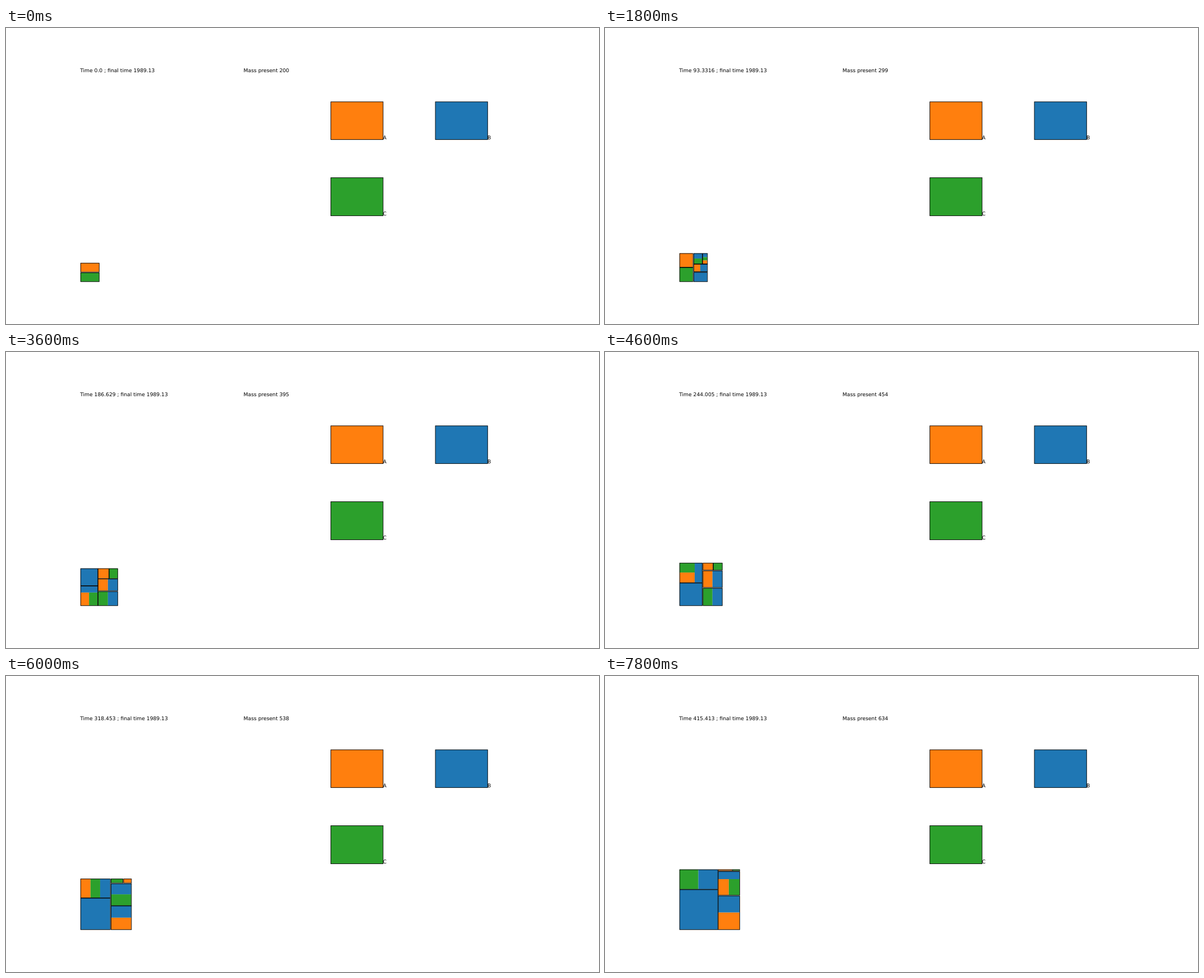
These frames come from a looping animation (1058x529 px, 8000 ms). An HTML page:

```html
<!DOCTYPE html>
<html lang="en">
<head>
<meta charset="utf-8">
<title>Reaction treemap</title>
<style>
html, body { margin: 0; width: 100%; height: 100%; overflow: hidden; background: #fff; }
svg { display: block; }
text { font: 13.89px "DejaVu Sans", sans-serif; text-rendering: geometricPrecision; white-space: pre; }
.edge { fill: none; stroke: #000; stroke-width: 1.39; }
</style>
</head>
<body>
<svg width="1058" height="529" viewBox="0 0 1600 800">
  <g id="legend"></g>
  <g id="map"></g>
  <text id="time" x="200" y="119.5"></text>
  <text id="mass" x="641" y="119.5"></text>
</svg>
<script>
const STEP = 200, STEPS = 40;
const LEFT = 200, BOTTOM = 685.82, SCALE = 0.2575, PAD = 0.67;
const COLORS = { A: '#ff7f0e', B: '#1f77b4', C: '#2ca02c' };

// step, clock, total mass, then counts of AB, CB and ACB
const KEYS = [
  [0, 0, 200, 0, 0, 0],
  [9, 93.3316, 299, 21, 18, 7],
  [18, 186.629, 395, 35, 41, 33],
  [23, 244.005, 454, 42, 44, 38],
  [30, 318.453, 538, 52, 48, 40],
  [35, 370.382, 589, 59, 59, 36],
  [39, 415.413, 634, 65, 67, 31]
];

const $ = id => document.getElementById(id);
const sum = list => list.reduce((a, b) => a + b, 0);

function rect(x0, y0, x1, y1, attrs) {
  return `<rect x="${x0}" y="${y0}" width="${x1 - x0}" height="${y1 - y0}" ${attrs}/>`;
}

// Fills sit on whole units, outlines half a unit further.
function fill(b, color) {
  return rect(...corners(b), `fill="${color}"`);
}

function edge(b) {
  return rect(...corners(b).map(v => v + 0.5), 'class="edge"');
}

function corners({ x, y, w, h }) {
  return [LEFT + x, BOTTOM - y - h, LEFT + x + w, BOTTOM - y].map(v => Math.floor(v + 0.5));
}

// One strip along the shorter side of the box, and the space left over.
function strip(areas, { x, y, w, h }) {
  const total = sum(areas), wide = w >= h;
  const depth = total / (wide ? h : w);
  let pos = 0;
  const boxes = areas.map(a => {
    const len = a / depth;
    const box = wide ? { x, y: y + pos, w: depth, h: len } : { x: x + pos, y, w: len, h: depth };
    pos += len;
    return box;
  });
  const rest = wide ? { x: x + depth, y, w: w - depth, h } : { x, y: y + depth, w, h: h - depth };
  return { boxes, rest };
}

function worst(areas, box) {
  return Math.max(...strip(areas, box).boxes.map(b => Math.max(b.w / b.h, b.h / b.w)));
}

function squarify(areas, box) {
  if (!areas.length) return [];
  let n = 1;
  while (n < areas.length && worst(areas.slice(0, n), box) >= worst(areas.slice(0, n + 1), box)) n++;
  const { boxes, rest } = strip(areas.slice(0, n), box);
  return boxes.concat(squarify(areas.slice(n), rest));
}

function treemap(weights, box) {
  const k = box.w * box.h / sum(weights);
  return squarify(weights.map(v => v * k), box);
}

function inset({ x, y, w, h }) {
  const px = w > 2 * PAD ? PAD : 0, py = h > 2 * PAD ? PAD : 0;
  return { x: x + px, y: y + py, w: w - 2 * px, h: h - 2 * py };
}

function stateAt(step) {
  const i = Math.max(1, KEYS.findIndex(k => k[0] >= step));
  const from = KEYS[i - 1], to = KEYS[i];
  const p = (step - from[0]) / (to[0] - from[0]);
  const at = (col, power = 1) => from[col] + (to[col] - from[col]) * p ** power;
  const count = (col, power) => Math.round(at(col, power));
  // Binding starts slowly while there is little B.
  const first = i === 1, pair = first ? 1.5 : 1, triple = first ? 2.5 : 1;
  const mass = count(2), ab = count(3, pair), cb = count(4, pair), acb = count(5, triple);
  const species = [
    ['C', 100 - cb - acb], ['A', 100 - ab - acb], ['CB', cb], ['AB', ab],
    ['B', mass - 200 - ab - cb - acb], ['ACB', acb]
  ].map(([name, n]) => ({ name, mass: n * name.length }));
  return { clock: at(1), mass, species };
}

function draw(step) {
  const { clock, mass, species } = stateAt(step);
  const side = mass * SCALE;
  const list = species.filter(s => s.mass > 0).sort((a, b) => b.mass - a.mass);
  const boxes = treemap(list.map(s => s.mass), { x: 0, y: 0, w: side, h: side }).map(inset);
  $('map').innerHTML = boxes.map((box, i) => {
    const parts = [...list[i].name];
    const cells = treemap(parts.map(() => 1), box);
    return cells.map((c, j) => fill(c, COLORS[parts[j]])).join('') + edge(box);
  }).join('');
  const label = clock ? Number(clock.toPrecision(6)) : '0.0';
  $('time').textContent = `Time ${label} ; final time 1989.13`;
  $('mass').textContent = `Mass present ${mass}`;
}

const LEGEND = [
  ['A', 876.5, 199.5, 1017.5, 301.5],
  ['B', 1158.5, 199.5, 1299.5, 301.5],
  ['C', 876.5, 404.5, 1017.5, 507.5]
];
$('legend').innerHTML = LEGEND.map(([name, x0, y0, x1, y1]) =>
  rect(x0, y0, x1, y1, `class="edge" style="fill:${COLORS[name]}"`) +
  `<text x="${x1 - 0.5}" y="${y1 - 0.5}">${name}</text>`).join('');

let shown = -1;
function tick() {
  const step = Math.floor(performance.now() / STEP) % STEPS;
  if (step !== shown) draw(shown = step);
  requestAnimationFrame(tick);
}
tick();
</script>
</body>
</html>
```
